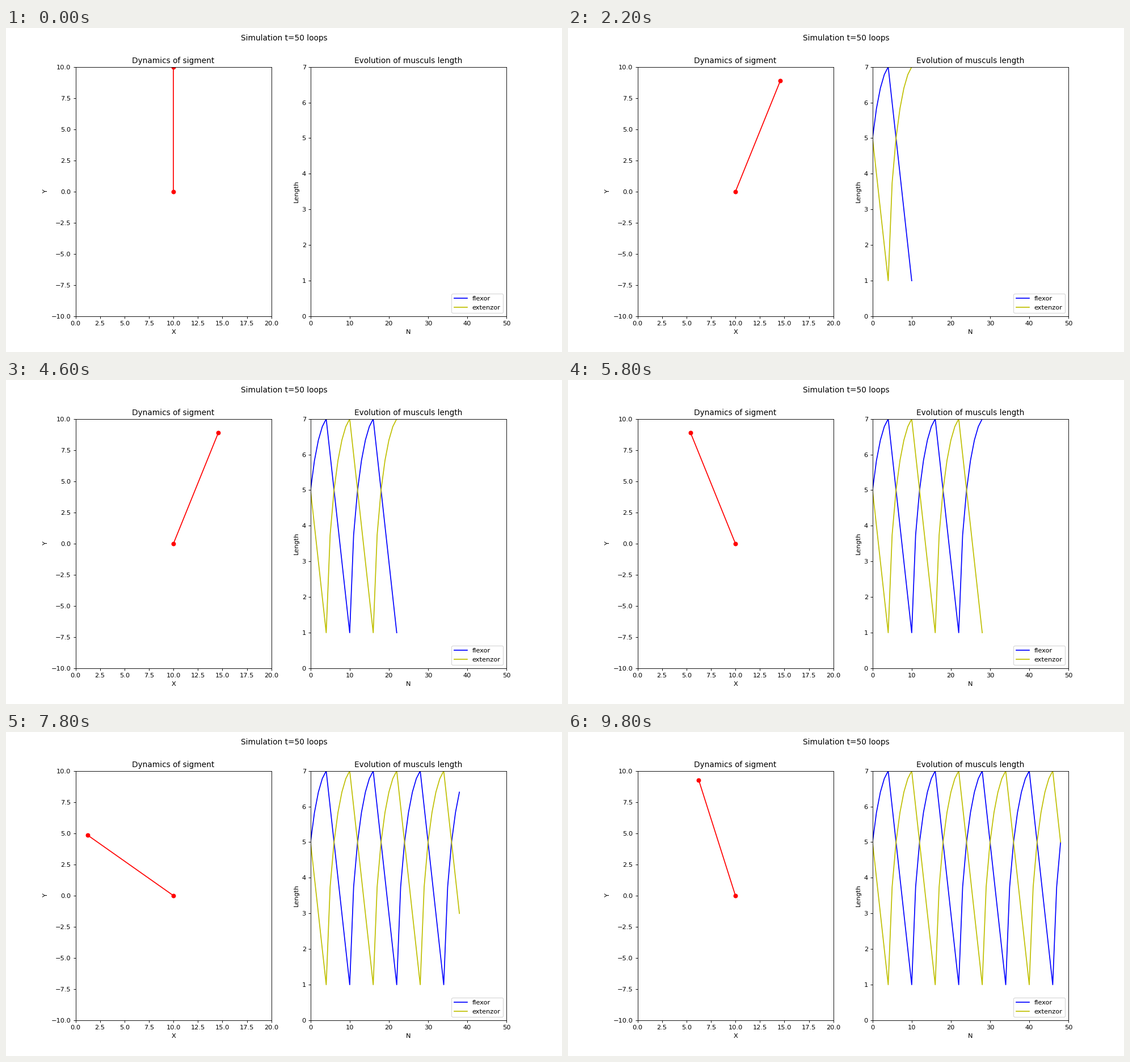
Animation of 980 by 572 pixels, one loop 10000 ms. Source, as a matplotlib script:

```python
import numpy as np
import matplotlib.pyplot as plt
from matplotlib.animation import FuncAnimation

WIDTH, HEIGHT = 980, 572
DPI = WIDTH / 12   # a figure 12 inches wide
EPS = 1e-3         # keeps the pixel size from being rounded down
LOOPS = 50
BONE = 10          # length of the moving segment
ARM_A, ARM_B = 3, 4  # distances of the muscle anchors from the joint
SQUARES = ARM_A**2 + ARM_B**2


def simulate(count):
    """Contract one muscle by 1 per step until it reaches its minimum, then swap."""
    lengths = {"flexor": 5.0, "extenzor": 5.0}
    active, passive = "extenzor", "flexor"
    history = {name: [] for name in lengths}
    for _ in range(count):
        for name, value in lengths.items():
            history[name].append(value)
        if lengths[active] < 1.5:
            active, passive = passive, active
            lengths[active] = round(lengths[active])
        lengths[active] -= 1
        lengths[passive] = np.sqrt(2 * SQUARES - lengths[active]**2)
    return np.array(history["flexor"]), np.array(history["extenzor"])


flexor, extenzor = simulate(LOOPS)
steps = np.arange(LOOPS)

# Law of cosines gives the tilt of the segment from the vertical.
tilt = np.arcsin(np.clip((extenzor**2 - SQUARES) / (2 * ARM_A * ARM_B), -1, 1))
tip_x = 10 + BONE * np.sin(tilt)
tip_y = BONE * np.cos(tilt)

fig, (ax_seg, ax_len) = plt.subplots(
    1, 2, figsize=((WIDTH + EPS) / DPI, (HEIGHT + EPS) / DPI), dpi=DPI)
fig.suptitle(f"Simulation t={LOOPS} loops")

ax_seg.set(title="Dynamics of sigment", xlabel="X", ylabel="Y",
           xlim=(0, 20), ylim=(-10, 10))
ax_len.set(title="Evolution of musculs length", xlabel="N", ylabel="Length",
           xlim=(0, LOOPS), ylim=(0, 7))

segment, = ax_seg.plot([], [], "ro-")
flexor_line, = ax_len.plot([], [], "b", label="flexor")
extenzor_line, = ax_len.plot([], [], "y", label="extenzor")
ax_len.legend(loc="lower right")


def update(i):
    segment.set_data([10, tip_x[i]], [0, tip_y[i]])
    flexor_line.set_data(steps[:i], flexor[:i])
    extenzor_line.set_data(steps[:i], extenzor[:i])
    return segment, flexor_line, extenzor_line


anim = FuncAnimation(fig, update, frames=LOOPS, interval=200,
                     init_func=lambda: update(0), repeat=True, repeat_delay=0)
plt.show()
```
